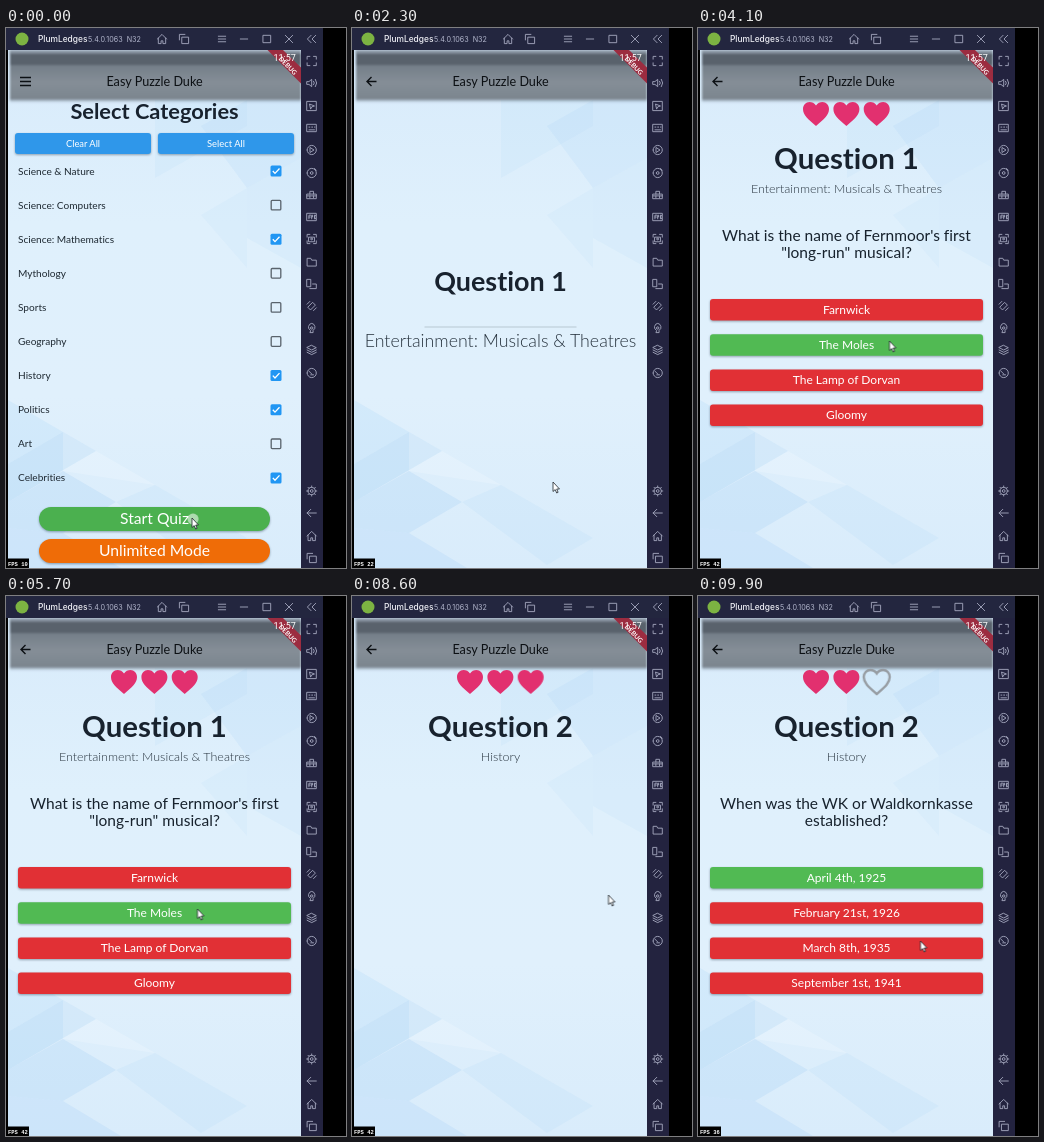
Animation, 340 px wide and 540 px high, one loop 10 s. Source, as an HTML page:

```html
<!DOCTYPE html>
<html lang="en">
<head>
<meta charset="utf-8">
<title>Trivia quiz</title>
<style>
html, body { margin: 0; width: 100%; height: 100%; overflow: hidden; background: #000; }
svg { display: block; width: 340px; height: 540px; font-family: Lato, "Open Sans", sans-serif; font-variant-ligatures: none; }
.mid { text-anchor: middle; }
.icon { fill: none; stroke: #a3a6bd; stroke-width: 1; stroke-linejoin: round; stroke-linecap: round; }
.heading { font-weight: 700; fill: #18222e; }
.category { font-weight: 300; font-size: 12.5px; fill: #26323d; }
.prompt { font-size: 15.5px; fill: #17222d; }
.label { font-size: 12px; fill: #fff; }
.raised { filter: drop-shadow(0 1px 1px rgba(20, 40, 60, .4)); }
.soft { filter: blur(.8px); }

/* One percent of the loop is 100 ms. */
.home, .back, .ripple, .q, .q *, .cursor { animation: 10s linear infinite; }
.home { animation-name: leave; }
.back { animation-name: arrive; }
.ripple { animation-name: ripple; transform-origin: 187px 491px; }
.cursor { animation-name: cursor; animation-timing-function: ease-in-out; }
.q1 { animation-name: first; }
.q2 { animation-name: second; }
.q2 * { animation-delay: -4.1s; }
.q .heading { animation-name: heading; }
.q .rule { animation-name: rule; }
.q .category { animation-name: category; }
.q .hearts { animation-name: hearts; }
.q .prompt { animation-name: prompt; }
.q .answers { animation-name: answers; }
.q .answer { animation-name: verdict; }
.q .lost { animation-name: lost; }
.q .empty { animation-name: empty; }

@keyframes leave { 0%, 2% { opacity: 1 } 5%, 100% { opacity: 0 } }
@keyframes arrive { 0%, 2% { opacity: 0 } 5%, 100% { opacity: 1 } }
@keyframes ripple {
  0% { opacity: .55; transform: scale(1) }
  3%, 100% { opacity: 0; transform: scale(5) }
}
@keyframes first { 0%, 60% { opacity: 1 } 62.5%, 100% { opacity: 0 } }
@keyframes second { 0%, 59.9% { opacity: 0 } 60%, 100% { opacity: 1 } }
@keyframes heading {
  0%, 3% { opacity: 0; transform: translateY(146px) scale(.9) }
  6%, 21.5% { opacity: 1; transform: translateY(146px) scale(.9); animation-timing-function: ease-in-out }
  27%, 100% { opacity: 1; transform: none }
}
@keyframes rule {
  0%, 4% { opacity: 1; transform: scaleX(0); animation-timing-function: ease-out }
  9%, 21.5% { opacity: 1; transform: none }
  24%, 100% { opacity: 0; transform: none }
}
@keyframes category {
  0%, 8% { opacity: 0; transform: translateY(180px) scale(1.5) }
  13%, 21.5% { opacity: 1; transform: translateY(180px) scale(1.5); animation-timing-function: ease-in-out }
  27%, 100% { opacity: 1; transform: none }
}
@keyframes hearts { 0%, 23% { opacity: 0 } 27%, 100% { opacity: 1 } }
@keyframes prompt { 0%, 28.5% { opacity: 0 } 32%, 100% { opacity: 1 } }
@keyframes answers { 0%, 33.5% { opacity: 0 } 36.5%, 100% { opacity: 1 } }
@keyframes verdict { 0%, 38% { fill: #2f97ea } 39.5%, 100% { fill: var(--verdict) } }
@keyframes lost { 0%, 38% { opacity: 1 } 39.5%, 100% { opacity: 0 } }
@keyframes empty { 0%, 38% { opacity: 0 } 39.5%, 100% { opacity: 1 } }
@keyframes cursor {
  0%, 1% { transform: translate(186px, 490px) }
  3%, 17% { transform: translate(187px, 482px) }
  19%, 34% { transform: translate(201px, 454px) }
  38%, 76% { transform: translate(191.5px, 313px) }
  78%, 93% { transform: translate(256.5px, 299px) }
  97%, 100% { transform: translate(222.5px, 345px) }
}
</style>
</head>
<body>
<script>
const CENTER = 148.5;

const text = (x, y, size, content, attrs = '') =>
  `<text x="${x}" y="${y}" font-size="${size}" ${attrs}>${content}</text>`;
const box = (x, y, w, h, r, attrs) =>
  `<rect x="${x}" y="${y}" width="${w}" height="${h}" rx="${r}" ${attrs}/>`;
const icon = (x, y, d) => `<path class="icon" transform="translate(${x} ${y}) scale(.92)" d="${d}"/>`;
const ring = r => `M${-r} 0a${r} ${r} 0 1 0 ${2 * r} 0a${r} ${r} 0 1 0 ${-2 * r} 0`;

const HOUSE = 'M-5 0L0-5L5 0M-4-1V5H-1V2H1V5H4V-1';
const COPY = 'M-2-2H5V5H-2ZM-5 1V-5H1';
const FRAME = 'M-5-4H5V4H-5Z';

const titleIcons = [
  [156, HOUSE], [178, COPY],
  [216, 'M-4-3H4M-4 0H4M-4 3H4'], [238, 'M-4 0H4'],
  [261, 'M-4-4H4V4H-4Z'], [283, 'M-4-4L4 4M4-4L-4 4'],
  [306, 'M-1-4L-5 0L-1 4M4-4L0 0L4 4'],
];
const sideIcons = [
  [33, 'M-5-2V-5H-2M2-5H5V-2M5 2V5H2M-2 5H-5V2'],
  [55, 'M-5-1.5H-3L0-4V4L-3 1.5H-5ZM2-2Q4 0 2 2M4-4Q7 0 4 4'],
  [78, 'M-5-5H5V5H-5ZM-2-2L3 0L0 1L-1 3Z'],
  [100, FRAME + 'M-3-1H-2M0-1H1M3-1H3.5M-3 2H3'],
  [122, ring(5) + 'M-1.5-2.5L2.5 0L-1.5 2.5Z'],
  [145, ring(5) + ring(1.5) + 'M3-5L5-3'],
  [167, 'M-5-1H5V4H-5ZM-2-1V-4H2V-1M-5 1H5M-2 1V3M2 1V3'],
  [189, FRAME + 'M-3 2V-2H-1M-3 0H-1.5M0 2V-2H1V0H0M3-2V2M4.3-2L3 0L4.3 2'],
  [211, 'M-5-2V-5H-2M2-5H5V-2M5 2V5H2M-2 5H-5V2M-3-2H3V3H-3Z' + ring(1)],
  [234, 'M-5 4V-4H-1L0-2H5V4Z'],
  [256, 'M-5-5H-1V3H-5ZM1 0H5V5H-2'],
  [278, 'M-4 1L1-4L4-1L-1 4ZM-5-2L-2-5M5 2L2 5'],
  [300, ring(1.3) + 'M-1.5 2.5Q-4 1-3.5-1.5Q-2.5-5 0-5Q2.5-5 3.5-1.5Q4 1 1.5 2.5V5H-1.5Z'],
  [322, 'M0-5L5-2.5L0 0L-5-2.5ZM-5 0L0 2.5L5 0M-5 2.5L0 5L5 2.5'],
  [345, ring(5) + 'M0 1L-3-2M-1 2H2'],
  [463, ring(4) + ring(1.5) + 'M0-4V-5.5M0 4V5.5M-4 0H-5.5M4 0H5.5M-3-3L-4-4M3 3L4 4M3-3L4-4M-3 3L-4 4'],
  [485, 'M5 0H-5M-1-4L-5 0L-1 4'],
  [508, HOUSE], [530, COPY],
];

// Facets of the wallpaper: colour, opacity, outline.
const facets = [
  ['#a8d0f2', .14, 'M149 72H241V98L149 150Z'],
  ['#a8d0f2', .2, 'M195 98L241 72H295V130L241 160Z'],
  ['#a8d0f2', .14, 'M241 160L295 130V240L241 210Z'],
  ['#a8d0f2', .1, 'M195 187L241 160V240Z'],
  ['#8fc4f0', .16, 'M2 372L57 404L2 436Z'],
  ['#8fc4f0', .26, 'M2 436L57 404L90 423L2 474Z'],
  ['#8fc4f0', .2, 'M2 474L57 443L110 474L57 505L2 500Z'],
  ['#fff', .18, 'M57 404L149 457L57 443Z'],
  ['#8fc4f0', .18, 'M2 500L57 505L115 540H2Z'],
  ['#a8d0f2', .16, 'M110 474L149 457L241 510L195 537Z'],
];

const categories = ['Science &amp; Nature', 'Science: Computers', 'Science: Mathematics', 'Mythology',
  'Sports', 'Geography', 'History', 'Politics', 'Art', 'Celebrities'];
const chosen = ['Science &amp; Nature', 'Science: Mathematics', 'History', 'Politics', 'Celebrities'];

const questions = [
  {
    category: 'Entertainment: Musicals &amp; Theatres',
    prompt: ["What is the name of Fernmoor's first", '"long-run" musical?'],
    answers: ['Farnwick', 'The Moles', 'The Lamp of Dorvan', 'Gloomy'],
    right: 1, losesHeart: false,
  },
  {
    category: 'History',
    prompt: ['When was the WK or Waldkornkasse', 'established?'],
    answers: ['April 4th, 1925', 'February 21st, 1926', 'March 8th, 1935', 'September 1st, 1941'],
    right: 0, losesHeart: true,
  },
];

function checkbox(y, on) {
  return on
    ? box(264.5, y - 5.5, 11, 11, 1.5, 'fill="#2196f3"') +
      `<path d="M266.8 ${y}L269 ${y + 2.4}L273.5 ${y - 2.5}" fill="none" stroke="#fff" stroke-width="1.3"/>`
    : box(265.2, y - 4.8, 9.6, 9.6, 1, 'fill="none" stroke="#59636c" stroke-width="1.3"');
}

function button(x, y, w, h, r, fill, size, label) {
  return box(x, y, w, h, r, `fill="${fill}" class="raised"`) +
    text(x + w / 2, y + h / 2 + size * .35, size, label, 'class="mid" fill="#fff"');
}

function home() {
  const rows = categories.map((name, i) => {
    const y = 143 + 34.1 * i;
    return text(12, y + 3.5, 10.1, name, 'fill="#1d2831"') + checkbox(y, chosen.includes(name));
  });
  return `<g class="home">
    <path d="M14 49.5H25M14 53.5H25M14 57.5H25" stroke="#0c1014" stroke-width="1.4"/>
    ${text(CENTER, 90.5, 21.8, 'Select Categories', 'class="mid heading"')}
    ${button(9, 105, 136, 21, 3, '#2f97ea', 9.4, 'Clear All')}
    ${button(152, 105, 136, 21, 3, '#2f97ea', 9.4, 'Select All')}
    ${rows.join('')}
    ${button(33, 479, 231, 24, 12, '#4bb04f', 15.7, 'Start Quiz')}
    ${button(33, 511, 231, 24, 12, '#ef6c07', 15.7, 'Unlimited Mode')}
    <circle class="ripple" cx="187" cy="491" r="5.5" fill="#fff"/>
  </g>`;
}

function heart(x, attrs) {
  return `<path transform="translate(${x} 86)" ${attrs}
    d="M0 12C-8 5-13 1-13-5C-13-9-10-12-6.5-12C-4-12-1.5-11 0-8.5C1.5-11 4-12 6.5-12C10-12 13-9 13-5C13 1 8 5 0 12Z"/>`;
}

function question(q, i) {
  const full = 'fill="#e2306f"';
  const last = q.losesHeart
    ? heart(178.7, full + ' class="lost"') +
      heart(178.7, 'class="empty" fill="none" stroke="#979da3" stroke-width="2.4"')
    : heart(178.7, full);
  const answers = q.answers.map((label, n) => {
    const y = 271 + 35.2 * n;
    const verdict = n === q.right ? '#51ba53' : '#e13035';
    return box(12, y, 273, 21.5, 3, `class="answer raised" style="--verdict:${verdict}"`) +
      `<text class="mid label" x="${CENTER}" y="${y + 14.7}">${label}</text>`;
  });
  const lines = q.prompt.map((line, n) => `<tspan x="${CENTER}" y="${212.7 + 17.3 * n}">${line}</tspan>`);
  return `<g class="q q${i + 1}">
    <g class="hearts">${heart(118, full)}${heart(148.4, full)}${last}</g>
    <g transform="translate(${CENTER} 131)">${text(0, 10, 29.4, `Question ${i + 1}`, 'class="mid heading"')}</g>
    <g transform="translate(${CENTER} 299)"><path class="rule" d="M-76 0H76" stroke="#7f8b96"/></g>
    <g transform="translate(${CENTER} 160.5)"><text class="mid category" y="4.4">${q.category}</text></g>
    <text class="mid prompt">${lines.join('')}</text>
    <g class="answers">${answers.join('')}</g>
  </g>`;
}

const wallpaper = box(2, 22, 293, 518, 0, 'fill="url(#sky)"') +
  facets.map(([fill, alpha, d]) => `<path d="${d}" fill="${fill}" opacity="${alpha}"/>`).join('');

const appBar = `<g class="soft">
  ${box(3.5, 22, 291.5, 4, 0, 'fill="#8d99a6"')}
  ${box(4, 25.5, 291, 11.5, 0, 'fill="#59626c"')}
  ${box(4, 37, 291, 34.5, 0, 'fill="url(#bar)"')}
  ${box(4, 71, 291, 4, 0, 'fill="url(#shade)"')}
  </g>
  ${text(CENTER, 57.5, 12.6, 'Easy Puzzle Duke', 'class="mid" fill="#0c1014"')}`;

const banner = `
  <path d="M261.5 22H277L295 39.5V55.5Z" fill="#9c2c40"/>
  <text class="mid" transform="translate(282 37.5) rotate(45)" y="2.5" font-size="6.5" font-weight="700" fill="#fff">DEBUG</text>
  ${text(267.5, 32.5, 9, '11:57', 'fill="#fff" font-family="Roboto, sans-serif"')}`;

const windowFrame = `
  ${box(0, 0, 317, 22, 0, 'fill="#23263f"')}
  ${box(295, 22, 22, 518, 0, 'fill="#23233f"')}
  <circle cx="16" cy="11" r="6.5" fill="#7cb342"/>
  <g font-family="Inter, sans-serif">
    ${text(32, 14, 8.4, 'PlumLedges', 'fill="#f0f1f7" font-weight="500"')}
    ${text(82, 13.7, 7.2, '5.4.0.1063&#160; N32', 'fill="#b4b8ce"')}
  </g>
  ${titleIcons.map(([x, d]) => icon(x, 11, d)).join('')}
  ${sideIcons.map(([y, d]) => icon(305.7, y, d)).join('')}`;

const gradient = (id, ...stops) => `<linearGradient id="${id}" x2="0" y2="1">${stops.map(([color, alpha], i) =>
  `<stop offset="${i / (stops.length - 1)}" stop-color="${color}" stop-opacity="${alpha}"/>`).join('')}</linearGradient>`;

document.body.innerHTML = `<svg viewBox="0 0 340 540">
  <defs>
    ${gradient('sky', ['#d8ebfb', 1], ['#dff0fc', 1], ['#e0f0fc', 1], ['#d9ecfb', 1])}
    ${gradient('bar', ['#747e88', 1], ['#858e97', 1], ['#7b858e', 1])}
    ${gradient('shade', ['#4d5a66', .45], ['#4d5a66', 0])}
  </defs>
  ${wallpaper}${appBar}
  <path class="back" d="M24.5 53.5H15M19.5 49L15 53.5L19.5 58" fill="none" stroke="#0c1014" stroke-width="1.4"/>
  ${home()}${questions.map(question).join('')}
  ${banner}${windowFrame}
  ${box(0, 530.5, 23, 9.5, 0, 'fill="#000"')}
  <text id="fps" x="2" y="538" font-size="5.5" font-weight="700" fill="#fff" font-family="'Liberation Mono', monospace"></text>
  <path class="cursor" d="M0 0V9.5L2.2 7.6L3.7 11L5.1 10.3L3.7 7H6.5Z" fill="#fff" stroke="#20262d" stroke-width=".8"/>
</svg>`;

// Frame-rate readout: start time and value.
const rates = [[0, 10], [600, 42], [2200, 22], [3400, 42], [6000, 44], [7100, 42], [9300, 36]];
const fps = document.getElementById('fps');
const start = performance.now();
function tick() {
  const time = (performance.now() - start) % 10000;
  fps.textContent = 'FPS ' + rates.findLast(([from]) => from <= time)[1];
  requestAnimationFrame(tick);
}
tick();
</script>
</body>
</html>
```
